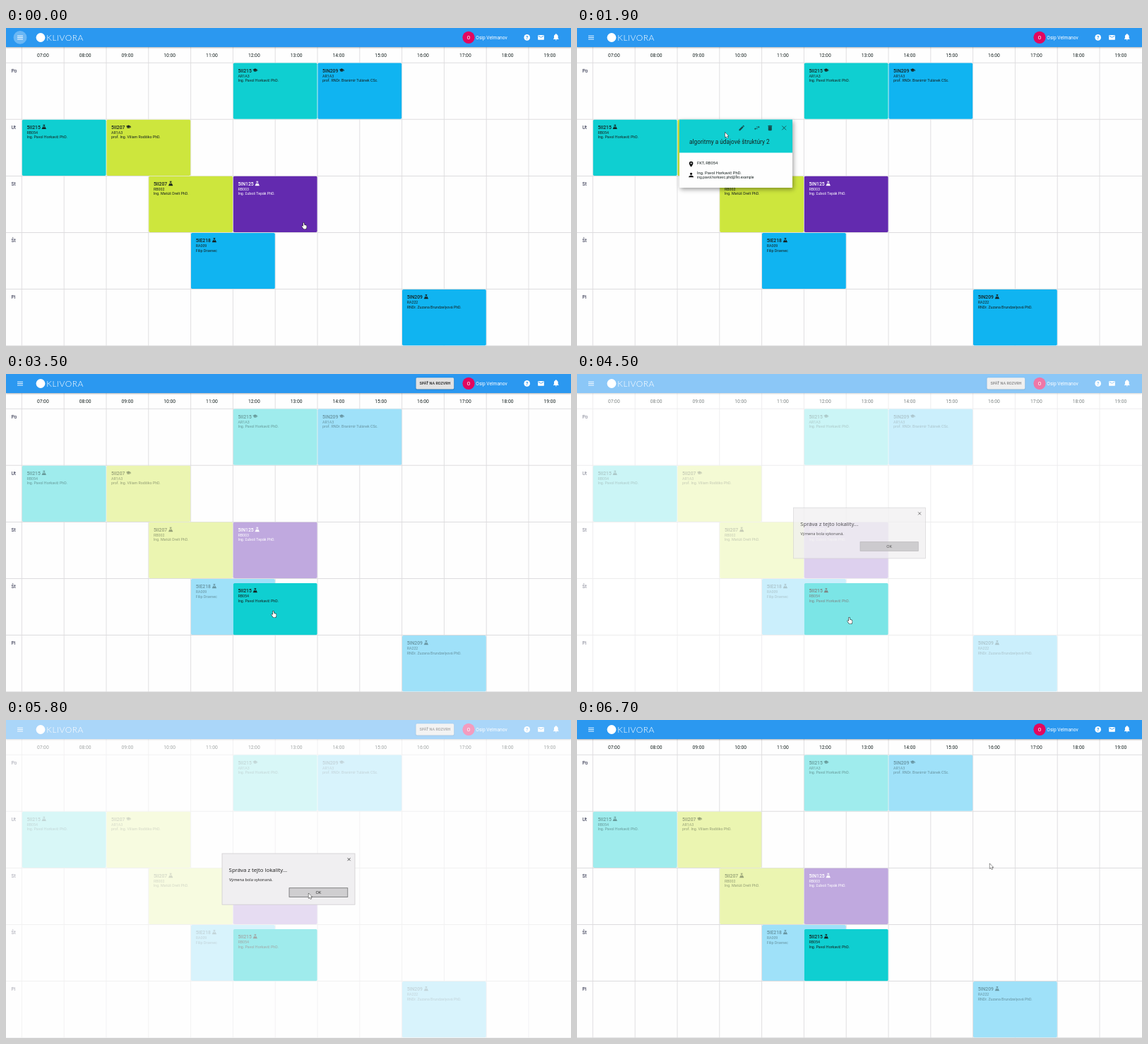
Recreate the animation shown at these times as an HTML page with a canvas. Size 800 by 450 pixels, loop 6800 ms.

```html
<!DOCTYPE html>
<html lang="sk">
<head>
<meta charset="utf-8">
<title>Rozvrh</title>
<style>
html, body { margin: 0; width: 100%; height: 100%; overflow: hidden; background: #fefefe; }
canvas { display: block; width: 800px; height: 450px; }
</style>
</head>
<body>
<canvas id="stage"></canvas>
<script>
const LOOP = 6800, STEP = 100;
const W = 800, H = 450;
const BAR = 27, LEFT = 22.4, TOP = 49.2, COL = 59.8, ROW = 80.1;
const PAPER = '#fefefe', INK = '#15201f';
const TEAL = '#0fcfd1', BLUE = '#10b4f1', LIME = '#cde63d', PURPLE = '#632aaf';
const TEACHER = 'Ing. Pavol Horkavič PhD.';

const canvas = document.getElementById('stage');
const ctx = canvas.getContext('2d');
const ratio = window.devicePixelRatio || 1;
canvas.width = W * ratio;
canvas.height = H * ratio;

// Icons on a 24-unit square
const icons = {
  pencil: 'M3 17.2V21h3.8L17.8 9.9l-3.7-3.7zM20.7 7a1 1 0 000-1.4l-2.3-2.3a1 1 0 00-1.4 0l-1.9 1.8 3.8 3.8z',
  swap: 'M7 11L3 15l4 4v-3h7v-2H7zM21 9l-4-4v3h-7v2h7v3z',
  trash: 'M6 19a2 2 0 002 2h8a2 2 0 002-2V7H6zM19 4h-3.5l-1-1h-5l-1 1H5v2h14z',
  pin: 'M12 2a7 7 0 00-7 7c0 5.2 7 13 7 13s7-7.8 7-13a7 7 0 00-7-7zm0 9.5a2.5 2.5 0 110-5 2.5 2.5 0 010 5z',
  person: 'M12 12a4 4 0 100-8 4 4 0 000 8zm0 2c-2.7 0-8 1.3-8 4v2h16v-2c0-2.7-5.3-4-8-4z',
  mail: 'M20 4H4a2 2 0 00-2 2v12a2 2 0 002 2h16a2 2 0 002-2V6a2 2 0 00-2-2zm0 4l-8 5-8-5V6l8 5 8-5z',
  bell: 'M12 22a2 2 0 002-2h-4a2 2 0 002 2zm6-6v-5c0-3.1-1.6-5.6-4.5-6.3V4a1.5 1.5 0 00-3 0v.7C7.6 5.4 6 7.9 6 11v5l-2 2v1h16v-1z',
  cap: 'M5 12v4c3 3 11 3 14 0v-4l-7 3zM12 4L0 9l12 5 9-3.700V16h2V9z',
  flask: 'M8 3h8v2h-1v4.5l5.5 9.5c.6 1-.1 2-1.2 2H4.7c-1.1 0-1.8-1-1.2-2L9 9.500V5H8zM11 5v5l-2 3.500h6L13 10V5z',
  hand: 'M8 2.500c0-2 3-2 3 0V9c1-1 2.700-.6 2.800.5 1-.8 2.600-.4 2.700.8 1.200-.6 2.500 0 2.500 1.500V17c0 3-1.500 5-4 5h-3c-2 0-3-1-4-2.500L4 14c-1-1.700 1-3 2.300-1.800L8 14z',
  arrow: 'M0 0V17.500l4-3.600 3 6.600 3-1.300-3-6.400h5.500z'
};
for (const key in icons) icons[key] = new Path2D(icons[key]);

// column, row, colour, code, icon, room, teacher
const cards = [
  [5, 0, TEAL, '5II215', 'cap', 'AR1A3', TEACHER],
  [7, 0, BLUE, '5IN209', 'cap', 'AR1A3', 'prof. RNDr. Branimír Tulánek CSc.'],
  [0, 1, TEAL, '5II215', 'flask', 'RB054', TEACHER],
  [2, 1, LIME, '5II207', 'cap', 'AR1A3', 'prof. Ing. Viliam Rodiško PhD.'],
  [3, 2, LIME, '5II207', 'flask', 'RB002', 'Ing. Matúš Drelt PhD.'],
  [5, 2, PURPLE, '5IN125', 'flask', 'RB003', 'Ing. Ľuboš Tepák PhD.'],
  [4, 3, BLUE, '5IE218', 'flask', 'RA009', 'Filip Dravnec'],
  [9, 4, BLUE, '5IN209', 'flask', 'RA222', 'RNDr. Zuzana Brundzelyová PhD.']
];

// time, x, y
const path = [
  [100, 422, 280], [1100, 80.5, 173], [1600, 80.5, 173], [2050, 257, 144],
  [2800, 257, 144], [3400, 379, 340], [3700, 379, 340], [4100, 386, 349],
  [5000, 386, 349], [5700, 430, 249], [6300, 430, 249], [6700, 586, 207]
];

const ramp = (t, a, b) => Math.min(1, Math.max(0, (t - a) / (b - a)));
const ease = p => p * p * (3 - 2 * p);

function box(x, y, w, h, fill, r = 0) {
  ctx.fillStyle = fill;
  ctx.beginPath();
  ctx.roundRect(x, y, w, h, r);
  ctx.fill();
}

function frame(x, y, w, h, color) {
  ctx.strokeStyle = color;
  ctx.lineWidth = 0.8;
  ctx.strokeRect(x, y, w, h);
}

function raised(x, y, w, h, fill, r, color, blur, dx, dy) {
  ctx.save();
  ctx.shadowColor = color;
  ctx.shadowBlur = blur * ratio;
  ctx.shadowOffsetX = dx * ratio;
  ctx.shadowOffsetY = dy * ratio;
  box(x, y, w, h, fill, r);
  ctx.restore();
}

function disc(x, y, r, fill) {
  ctx.fillStyle = fill;
  ctx.beginPath();
  ctx.arc(x, y, r, 0, 7);
  ctx.fill();
}

function text(str, x, y, size, fill = INK, weight = 400, align = 'left', font = 'Roboto') {
  ctx.font = `${weight} ${size}px "${font}", sans-serif`;
  ctx.fillStyle = fill;
  ctx.textAlign = align;
  ctx.fillText(str, x, y + size * 0.355);
}

function icon(name, x, y, size, fill) {
  ctx.save();
  ctx.translate(x - size / 2, y - size / 2);
  ctx.scale(size / 24, size / 24);
  ctx.fillStyle = fill;
  ctx.fill(icons[name], 'evenodd');
  ctx.restore();
}

function cross(x, y, r, color) {
  ctx.strokeStyle = color;
  ctx.lineWidth = 0.9;
  ctx.beginPath();
  ctx.moveTo(x - r, y - r);
  ctx.lineTo(x + r, y + r);
  ctx.moveTo(x + r, y - r);
  ctx.lineTo(x - r, y + r);
  ctx.stroke();
}

function drawGrid() {
  box(0, 0, W, H, PAPER);
  for (let i = 0; i <= 12; i++) box(LEFT + i * COL - 0.5, BAR, 1, H - BAR, '#e0dfe1');
  for (let i = 0; i <= 5; i++) box(0, TOP + i * ROW - 0.5, W, 1, '#dddcde');
  for (let i = 0; i <= 12; i++) {
    const hour = String(7 + i).padStart(2, '0');
    text(hour + ':00', LEFT + (i + 0.5) * COL, 38.2, 6.75, INK, 400, 'center');
  }
  ['Po', 'Ut', 'St', 'Št', 'Pi'].forEach((day, i) =>
    text(day, 7.4, 60.3 + i * ROW, 6.75, '#1c1f3c'));
}

function drawBar(t) {
  raised(0, 0, W, BAR, '#2b98f0', 0, 'rgba(0,0,0,.3)', 2, 0, 0.7);

  const glow = 1 - ramp(t, 0, 400);
  if (glow) disc(20, 13.4, 9.4, `rgba(255,255,255,${0.3 * glow})`);
  for (let i = 0; i < 3; i++) box(16, 10.7 + i * 2.4, 8, 0.9, '#fff');

  disc(49, 13.5, 6.4, '#fff');
  ctx.letterSpacing = '0.5px';
  text('KLIVORA', 57.3, 13.6, 12, '#fff', 300, 'left', 'Lato');
  ctx.letterSpacing = '0px';

  if (t >= 2800 && t < 6600) {
    raised(580.5, 5.2, 53.7, 16.2, '#e1e1e2', 1.6, 'rgba(0,0,0,.35)', 1.6, 0, 0.6);
    text('SPÄŤ NA ROZVRH', 607.4, 13.5, 5.4, '#222', 500, 'center');
  }
  disc(655, 13.3, 8.6, '#e2075f');
  text('O', 655, 13.4, 7.2, '#fff', 400, 'center');
  text('Osip Velmanov', 665.3, 13.5, 6.67, '#fff');
  disc(737.7, 13.4, 4.3, '#fff');
  text('?', 737.7, 13.5, 7, '#2b98f0', 700, 'center');
  icon('mail', 757.5, 13.4, 10.4, '#fff');
  icon('bell', 778.8, 12.6, 11.5, '#fff');
}

function drawCard(x, y, h, [, , color, code, kind, room, teacher], alpha = 1) {
  const w = COL * 2 - 0.8, tx = x + 6.7;
  const light = color === PURPLE;
  const ink = light ? '#fff' : INK;
  box(x, y, w, h, PAPER, 1.7);
  ctx.globalAlpha = alpha;
  box(x, y, w, h, color, 1.7);
  if (light) ctx.globalAlpha = 1;
  text(code, tx, y + 10.9, 6.8, ink, 500);
  const end = tx + ctx.measureText(code).width;
  icon(kind, end + 5, y + 10.2, kind === 'cap' ? 7.4 : 8.4, ink);
  text(room, tx, y + 18.5, 5.3, ink);
  text(teacher, tx, y + 24.8, 5.3, ink);
  ctx.globalAlpha = 1;
}

function drawCards(t) {
  const alpha = t >= 2800 ? 0.4 : 1;
  for (const card of cards)
    drawCard(LEFT + card[0] * COL + 0.4, TOP + card[1] * ROW + 0.4, ROW - 0.9, card, alpha);
  if (t >= 2900) drawCard(LEFT + 5 * COL + 0.4, 296, 73.3, cards[2]);
}

function drawPopup(t) {
  const show = ease(ramp(t, 1400, 1700)) * (1 - ramp(t, 2700, 3000));
  if (!show) return;
  ctx.save();
  ctx.globalAlpha = show;
  if (t < 1700) {
    const s = 0.75 + 0.25 * show;
    ctx.translate(145, 129.5);
    ctx.scale(s, s);
    ctx.translate(-145, -129.5);
  }
  raised(145, 129.5, 160, 96.5, PAPER, 0.8, 'rgba(0,0,0,.38)', 6, 1.5, 2.5);
  box(145, 129.5, 160, 47, TEAL);

  const dark = '#17494a';
  if (t >= 2000) disc(254.6, 141.8, 9, 'rgba(0,0,0,.13)');
  icon('pencil', 233.2, 141.4, 10, dark);
  icon('swap', 254.8, 141.4, 10, dark);
  icon('trash', 273.3, 141.4, 10, dark);
  cross(293.2, 141.4, 2.9, dark);
  text('algoritmy a údajové štruktúry 2', 159, 161, 8.3);
  icon('pin', 161.6, 192.8, 9.6, '#111');
  icon('person', 161.6, 208, 10, '#111');
  text('FKT, RB054', 170, 191.2, 5.8);
  text(TEACHER, 170, 204.6, 5.8);
  text('ing.pavol.horkavic.phd@fkt.example', 170, 211.2, 5);
  ctx.restore();

  if (t >= 2100 && t < 2800) {
    box(232.4, 116.4, 41.8, 9, '#626262', 1);
    text('Požiadať o výmenu', 253.3, 121, 4.15, '#fff', 400, 'center');
  }
}

function drawDialog(t) {
  const open = ramp(t, 4200, 4600);
  const veil = open * (1 - ramp(t, 6100, 6500));
  const shut = ramp(t, 6200, 6500);
  if (!veil) return;
  box(0, 0, W, H, `rgba(255,255,255,${0.6 * veil})`);
  ctx.save();
  ctx.globalAlpha = open * (1 - shut);
  const s = 0.96 + 0.04 * ease(open) + 0.06 * shut;
  ctx.translate(400, 225);
  ctx.scale(s, s);
  ctx.translate(-400, -225);
  box(306, 189, 188, 72.2, '#f0eff1');
  frame(306, 189, 188, 72.2, '#cfced0');
  cross(485.6, 197.2, 2, '#444');
  text('Správa z tejto lokality...', 315.6, 212.2, 7.8, '#1a1a1a', 400, 'left', 'Open Sans');
  text('Výmena bola vykonaná.', 316, 225.6, 5.6, '#1a1a1a', 400, 'left', 'Open Sans');
  const hover = t >= 5600;
  box(401, 237.7, 82.8, 12.9, hover ? '#cfced0' : '#c2c1c3');
  frame(401, 237.7, 82.8, 12.9, hover ? '#6f6f70' : '#b3b2b4');
  text('OK', 442.3, 244.2, 5.6, '#222', 400, 'center', 'Open Sans');
  ctx.restore();
}

function pointer(t) {
  let i = 0;
  while (i < path.length - 2 && t > path[i + 1][0]) i++;
  const [t0, x0, y0] = path[i], [t1, x1, y1] = path[i + 1];
  const p = ease(ramp(t, t0, t1));
  return [x0 + (x1 - x0) * p, y0 + (y1 - y0) * p];
}

function overLink(t, x, y) {
  if (t > 5000) return false;
  if (t >= 1500 && t < 2900 && x > 145 && x < 305 && y > 129 && y < 226)
    return x > 225 && y < 150;
  const col = (x - LEFT) / COL, row = Math.floor((y - TOP) / ROW);
  if (t >= 2900 && row === 3 && col >= 5 && col < 7) return true;
  return cards.some(c => c[1] === row && col >= c[0] && col < c[0] + 2);
}

function drawPointer(t) {
  const [x, y] = pointer(t);
  const hand = overLink(t, x, y);
  const shape = hand ? icons.hand : icons.arrow;
  const s = hand ? 0.43 : 0.4;
  ctx.save();
  if (hand) ctx.translate(x - 4.6, y - 5);
  else ctx.translate(x - 1.6, y - 3.8);
  ctx.scale(s, s);
  ctx.lineWidth = 2.4;
  ctx.lineJoin = 'round';
  ctx.strokeStyle = '#111';
  ctx.stroke(shape);
  ctx.fillStyle = '#fff';
  ctx.fill(shape);
  ctx.restore();
}

function draw(t) {
  ctx.setTransform(ratio, 0, 0, ratio, 0, 0);
  drawGrid();
  drawCards(t);
  drawBar(t);
  drawPopup(t);
  drawDialog(t);
  drawPointer(t);
}

const start = performance.now();
function tick() {
  const t = (performance.now() - start) % LOOP;
  draw(Math.floor(t / STEP) * STEP);
  requestAnimationFrame(tick);
}
tick();
</script>
</body>
</html>
```
